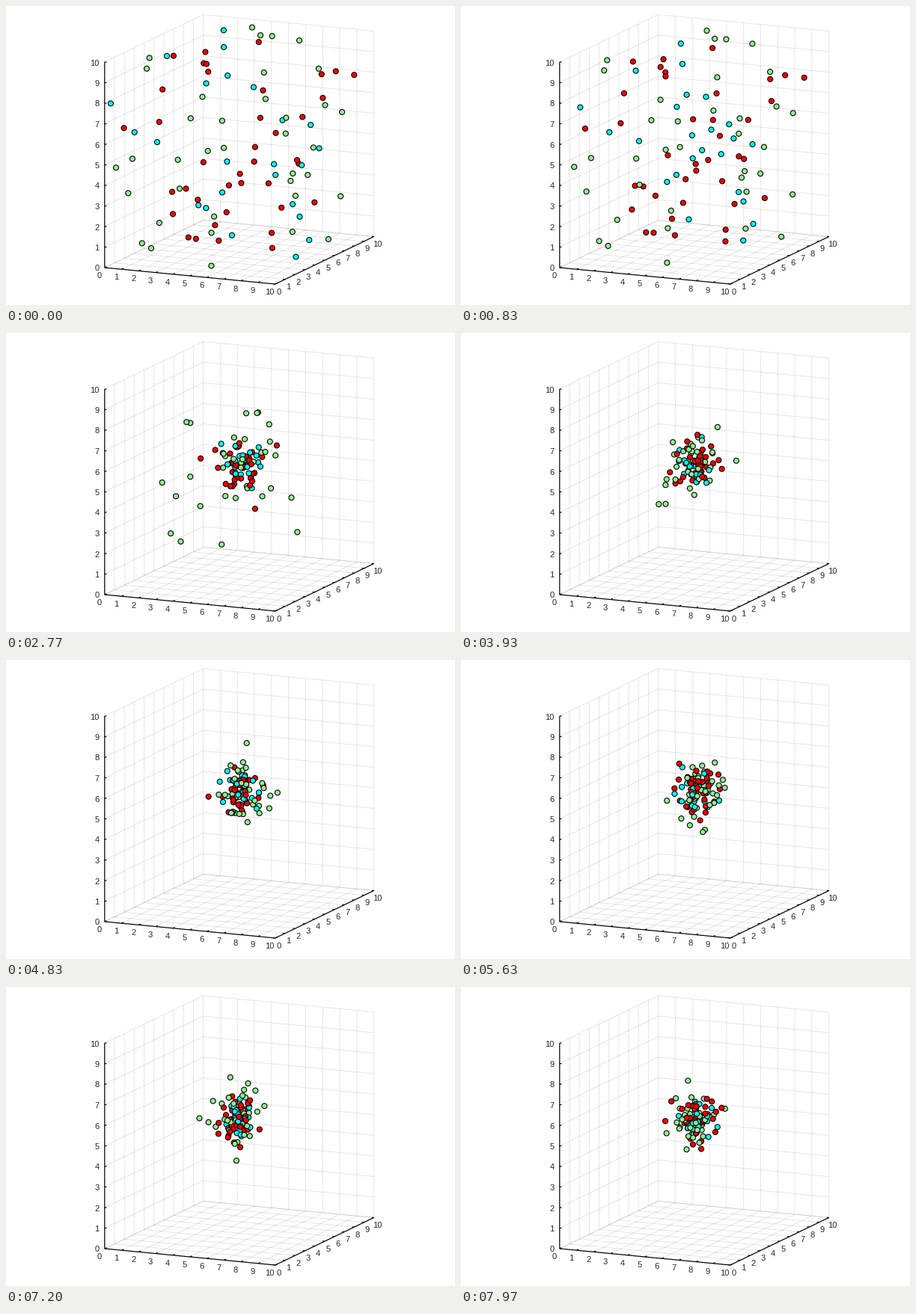
Animation, 600 px wide and 400 px high, one loop 8000 ms. Source, as a matplotlib script:

```python
import numpy as np
import matplotlib.pyplot as plt
from matplotlib.animation import FuncAnimation
from matplotlib.collections import LineCollection

W, H, DPI = 600, 400, 100
FRAMES, LOOP = 240, 8000
PX = 72 / DPI
SIZE = 10                                   # edge of the cube
CENTER = np.array([5.1, 5.0, 5.6])
TOWARD_VIEWER = np.array([0.58, -1.0, 0.28])

# colour: count, seconds of fall per unit of distance, cloud size, orbit speed
KINDS = {
    "#90ee90": (37, 0.65, 0.75, 1.5),
    "#ff0000": (39, 0.51, 0.55, 2.2),
    "#00ffff": (24, 0.30, 0.45, 3.6),
}
# slow outer particles that stay in view longest
OUTER = [(2.73, 0, 1.16), (2.05, 2, 1.88), (9.65, 6, 0.77), (9.87, 7, 6.74),
         (6.21, 9, 9.47), (3.93, 9, 9.54), (1.89, 1, 9.60), (1.05, 1, 5.15)]

rng = np.random.default_rng(7)


def project(x, y, z):
    return (131.8 + 22.8 * x + 13.18 * y,
            350 + 2.2 * x - 6.35 * y - 27.5 * z)


def scatter_evenly(n):
    """Random points that cover every axis of the cube evenly."""
    cells = np.column_stack([rng.permutation(n) for _ in range(3)])
    return (cells + rng.random((n, 3))) * SIZE / n


counts, slowness, cloud, speed = (np.array(v) for v in zip(*KINDS.values()))
kind = np.repeat(np.arange(len(KINDS)), counts)
colors = np.array(list(KINDS))[kind]
total = len(kind)

start = np.vstack([scatter_evenly(n) for n in counts])
start[:len(OUTER)] = OUTER
start -= CENTER
arrive = np.maximum(slowness[kind] * np.linalg.norm(start, axis=1), 0.8)

axis_a, axis_b = rng.normal(size=(2, total, 3)) * cloud[kind][:, None]
phase = rng.uniform(0, 2 * np.pi, total)
omega = speed[kind] * rng.uniform(0.7, 1.3, total) * rng.choice([-1, 1], total)


def positions(t):
    u = t / arrive
    late = np.maximum(t - arrive, 0)
    # accelerate inwards, then a damped swing through the middle
    swing = -2.2 / (arrive * 5) * np.sin(5 * late) * np.exp(-1.2 * late)
    scale = np.where(u < 1, 1 - u ** 2.2, swing)

    angle = (omega * t + phase)[:, None]
    orbit = axis_a * np.cos(angle) + axis_b * np.sin(angle)
    settled = np.clip(u, 0, 1) ** 4
    return CENTER + start * scale[:, None] + orbit * settled[:, None]


def segment(p, q):
    return [project(*p), project(*q)]


fig = plt.figure(figsize=(W / DPI, H / DPI), dpi=DPI, facecolor="white")
ax = fig.add_axes([0, 0, 1, 1])
ax.set_xlim(0, W)
ax.set_ylim(H, 0)
ax.axis("off")

grid, ticks = [], []
label = dict(fontname="Liberation Sans", fontsize=8, color="#262626",
             va="center_baseline")
for k in range(SIZE + 1):
    grid += [
        segment((0, 0, k), (0, SIZE, k)), segment((0, SIZE, k), (SIZE, SIZE, k)),
        segment((k, SIZE, 0), (k, SIZE, SIZE)),
        segment((k, 0, 0), (k, SIZE, 0)), segment((0, k, 0), (SIZE, k, 0)),
    ]
    if k < SIZE:                            # the back corner is drawn once
        grid.append(segment((0, k, 0), (0, k, SIZE)))
    for point, (dx, dy), (lx, ly), align in (
        ((k, 0, 0), (2.6, -1.3), (-7.2, 10), "center"),
        ((SIZE, k, 0), (-2.7, -0.3), (4.5, 9.5), "center"),
        ((0, 0, k), (2.6, 0), (-7.3, 0.5), "right"),
    ):
        x, y = project(*point)
        ticks.append([(x, y), (x + dx, y + dy)])
        ax.text(x + lx, y + ly, str(k), ha=align, **label)

edges = [segment((0, 0, 0), (SIZE, 0, 0)), segment((SIZE, 0, 0), (SIZE, SIZE, 0)),
         segment((0, 0, 0), (0, 0, SIZE))]
ax.add_collection(LineCollection(grid, colors=[(0, 0, 0, 0.1)], linewidths=PX,
                                 snap=False))
ax.add_collection(LineCollection(edges + ticks, colors="black",
                                 linewidths=1.2 * PX, snap=False))

dots = ax.scatter(np.zeros(total), np.zeros(total), s=(7 * PX) ** 2, c=colors,
                  edgecolors="black", linewidths=1.1 * PX, zorder=5)


def draw(i):
    pos = positions(i * LOOP / FRAMES / 1000)
    order = np.argsort(pos @ TOWARD_VIEWER)
    dots.set_offsets(np.column_stack(project(*pos[order].T)))
    dots.set_facecolors(colors[order])
    return (dots,)


anim = FuncAnimation(fig, draw, frames=FRAMES, interval=LOOP / FRAMES,
                     init_func=lambda: draw(0), repeat=True, repeat_delay=0)
plt.show()
```
